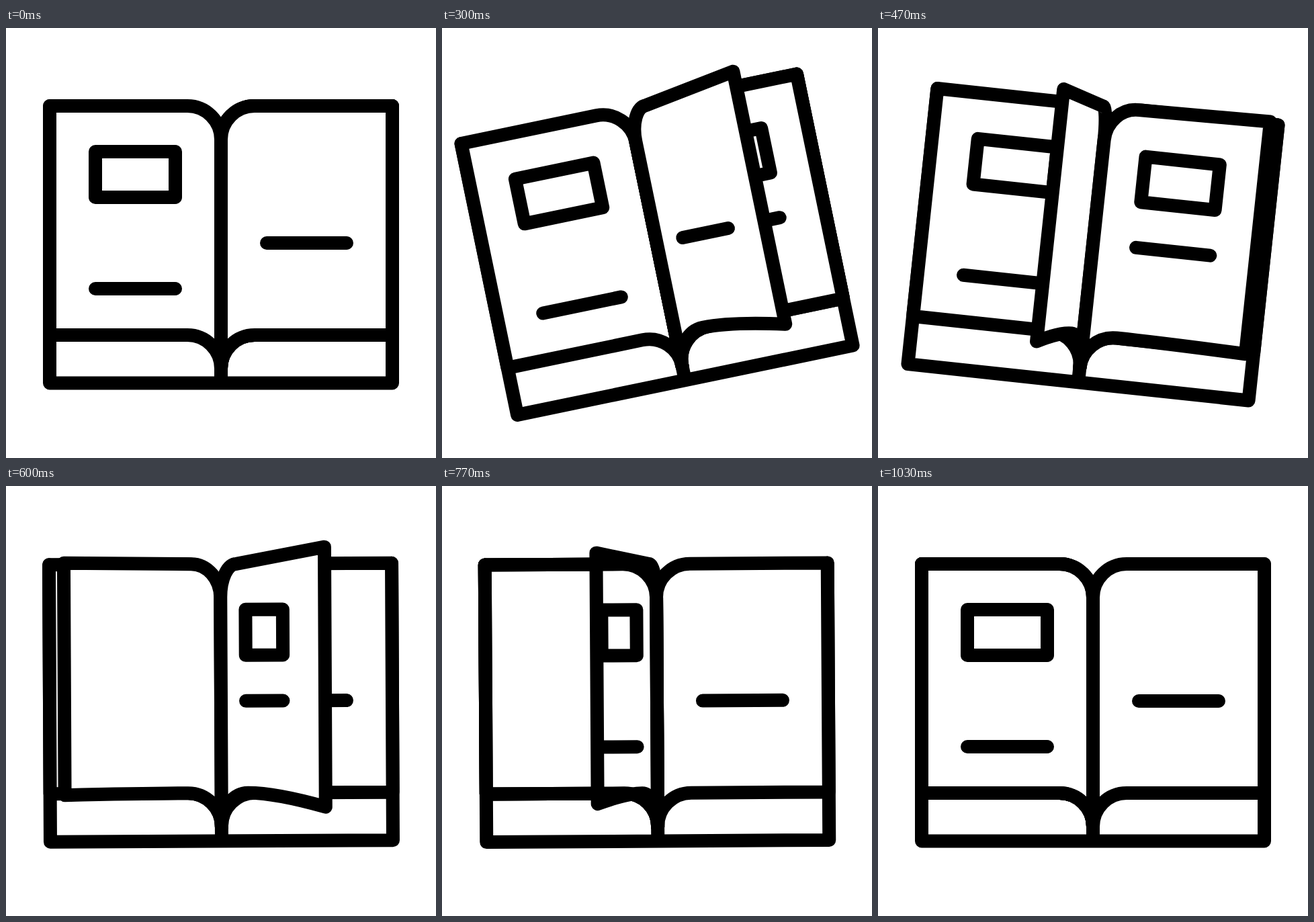
Animation, 640 px wide and 640 px high, one loop 1.67 s. Source, as an HTML page:

```html
<!DOCTYPE html>
<html lang="en">
<head>
<meta charset="utf-8">
<title>Book</title>
<style>
  html, body { margin: 0; width: 100%; height: 100%; overflow: hidden; background: #fff; }
  svg { display: block; width: 100vw; height: 100vh; }
  path { fill: none; stroke: #000; stroke-width: 20; stroke-linecap: round; stroke-linejoin: round; }
  .sheet { fill: #fff; }
</style>
</head>
<body>
<svg viewBox="0 0 640 640">
  <g id="book">
    <path id="cover" d="M65 116V528.5H575V116M320 507V528.5"/>
    <path id="left" class="sheet"/>
    <path id="leftMarks"/>
    <path id="right" class="sheet"/>
    <path id="rightMarks"/>
    <g id="pages"></g>
    <path id="leftRim"/>
  </g>
</svg>
<script>
const LOOP = 1670, STEP = 100 / 3, LAST = 31;
const SPINE = 320, TOP = 116, BOTTOM = 457, WIDTH = 255;
const $ = id => document.getElementById(id);

// [step, value]; page values run from 1 (right) to -1 (left)
const TILT = [[0, 0], [8.3, -12.3], [14.9, 7.1], [18.2, -0.35], [24, -0.35], [31, 0]];
const TURN_1 = [[3.5, 1], [5, 0.982], [9, 0.64], [14, -0.267], [18, -0.914], [20.5, -1]];
const TURN_2 = [[12.2, 1], [14, 0.953], [18, 0.608], [23, -0.35], [27, -0.94], [30, -1]];

// Smooth curve through the keys, flat at both ends and at turning points
function track(keys, n) {
  const end = keys.length - 1;
  if (n <= keys[0][0]) return keys[0][1];
  if (n >= keys[end][0]) return keys[end][1];
  const slope = i => {
    if (i === 0 || i === end) return 0;
    const [a, b, c] = [keys[i - 1], keys[i], keys[i + 1]];
    return (b[1] - a[1]) * (c[1] - b[1]) <= 0 ? 0 : (c[1] - a[1]) / (c[0] - a[0]);
  };
  const i = keys.findIndex(k => k[0] > n) - 1;
  const [x0, y0] = keys[i], [x1, y1] = keys[i + 1];
  const h = x1 - x0, u = (n - x0) / h, v = 1 - u;
  return y0 * (1 + 2 * u) * v * v + y1 * (3 - 2 * u) * u * u
    + h * u * v * (slope(i) * v - slope(i + 1) * u);
}

function sheet(r) {
  const side = r < 0 ? -1 : 1, size = Math.abs(r);
  const a = side * 50 * size ** 1.5;
  const b = side * 50 * Math.min(1, size * 1.3);
  const rise = r > 0 ? 39 * (1 - r * r) : 26 * (1 + r);
  const drop = r > 0 ? 34 * (1 - r * r) : 24 * (1 + r);
  const edge = SPINE + WIDTH * r, foot = SPINE + b;
  return `M${SPINE} 507C${SPINE} 479.4 ${SPINE + 0.448 * b} ${BOTTOM} ${foot} ${BOTTOM}`
    + `Q${foot + 0.35 * (edge - foot)} ${BOTTOM} ${edge} ${BOTTOM + drop}`
    + `V${TOP - rise}L${SPINE + a} ${TOP}`
    + `C${SPINE + 0.448 * a} ${TOP} ${SPINE} 138.4 ${SPINE} 166Z`;
}

// squeeze: how far the outer ends draw in while the page stands up
function marks(r, { box, lineY, squeeze = 0.1 }) {
  const bend = 1 - r * r;
  const x0 = SPINE + 68 * (r - 0.1 * bend), x1 = SPINE + 187 * (r - squeeze * bend);
  return (box ? `M${x0} 184H${x1}V252H${x0}Z` : '') + (lineY ? `M${x0} ${lineY}H${x1}` : '');
}

function makePage(front, back) {
  const g = document.createElementNS('http://www.w3.org/2000/svg', 'g');
  const [body, ink] = ['sheet', 'ink'].map(name => {
    const p = document.createElementNS(g.namespaceURI, 'path');
    p.setAttribute('class', name);
    return g.appendChild(p);
  });
  const pose = r => {
    body.setAttribute('d', sheet(r));
    ink.setAttribute('d', marks(r, r > 0 ? front : back));
  };
  return { g, pose };
}

const LEFT_FACE = { box: true, lineY: 388 }, RIGHT_FACE = { lineY: 320 };
$('left').setAttribute('d', sheet(-1));
$('leftRim').setAttribute('d', sheet(-1));
$('right').setAttribute('d', sheet(1));
$('leftMarks').setAttribute('d', marks(-1, LEFT_FACE));
$('rightMarks').setAttribute('d', marks(1, RIGHT_FACE));

const page1 = makePage(RIGHT_FACE, {});
const page2 = makePage({ box: true, lineY: 320, squeeze: 0.18 }, LEFT_FACE);
let stacked = null;

function draw(n) {
  const r1 = track(TURN_1, n), r2 = track(TURN_2, n);
  page1.pose(r1);
  page2.pose(r2);
  const top = r1 > 0 ? page1 : page2;
  if (top !== stacked) {
    $('pages').append(top === page1 ? page2.g : page1.g, top.g);
    stacked = top;
  }
  $('leftRim').style.display = r2 < 0 ? '' : 'none';
  $('book').setAttribute('transform', `rotate(${track(TILT, n)} 320 322)`);
}

const start = performance.now();
function tick(now) {
  const t = Math.max(0, now - start) % LOOP;
  draw(Math.min(LAST, Math.floor((t + 3.4) / STEP)));
  requestAnimationFrame(tick);
}
draw(0);
requestAnimationFrame(tick);
</script>
</body>
</html>
```
